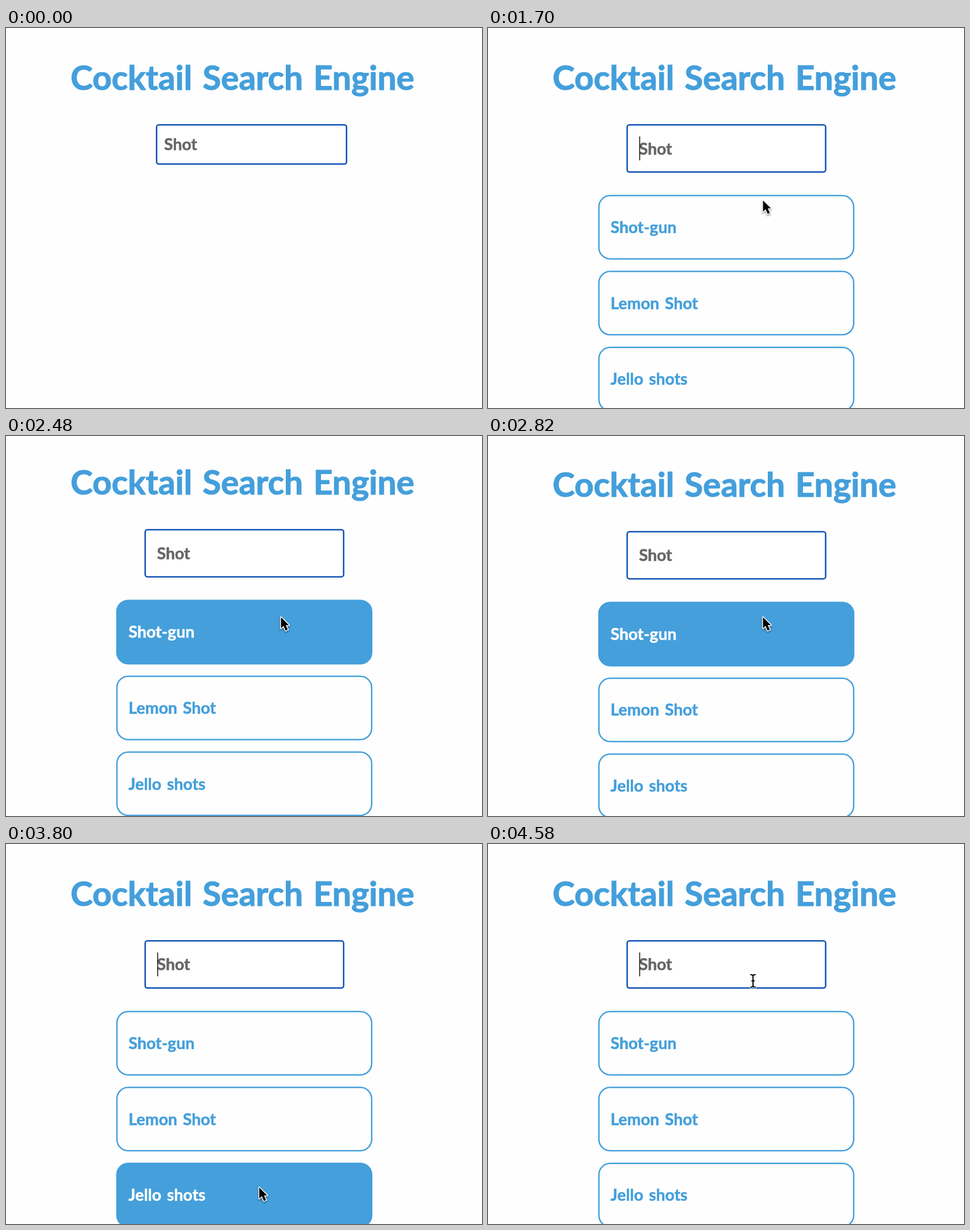
Write an HTML page that moves like this. It is 837x669 px and loops after 4.6 s.

```html
<!DOCTYPE html>
<html lang="en">
<head>
<meta charset="utf-8">
<title>Cocktail Search Engine</title>
<style>
  html, body { margin: 0; width: 100%; height: 100%; overflow: hidden; background: #fefefe; }
  svg { display: block; }
  text { font: 700 28.5px Lato, sans-serif; word-spacing: 3px;
         fill: var(--ink); stroke: var(--ink); stroke-width: .02em; --ink: #449fdb; }
  #title { font-size: 59px; word-spacing: 4px; }
  #hint { --ink: #666; }
  #field { fill: #fff; stroke: #0c50b4; stroke-width: 2.5; }
  .card rect { fill: #fefefe; stroke: #449fdb; stroke-width: 2.5; }
  .card.hover rect { fill: #449fdb; }
  .card.hover text { --ink: #fff; }
  #arrow { stroke: #fff; stroke-width: 3; stroke-linejoin: round; paint-order: stroke;
           filter: drop-shadow(0 2px 1.5px #0006); }
  #beam use { fill: none; stroke-linecap: round; }
</style>
</head>
<body>
<svg width="837" height="669" viewBox="0 0 837 669">
  <defs><path id="beamShape" d="M-4-11Q0-11 0-8Q0-11 4-11M0-8V8M-4 11Q0 11 0 8Q0 11 4 11M-2 0H2"/></defs>
  <g id="page">
    <text id="title" x="113.5" y="109">Cocktail Search Engine</text>
    <rect id="field" y="170.5" rx="4"/>
    <text id="hint">Shot</text>
    <rect id="caret" x="266" y="191" width="1.4" height="42"/>
    <g id="list"></g>
  </g>
  <path id="arrow" d="M0 0V19.5L4.6 15.3L8.2 23.7L12 22L8.4 13.9H14Z"/>
  <g id="beam">
    <use href="#beamShape" stroke="#fff" stroke-width="4"/>
    <use href="#beamShape" stroke="#000" stroke-width="2"/>
  </g>
</svg>
<script>
const LOOP = 4600, LOADED = 20, BLINK = 1100, HOVER_LAG = 40;
const CARD_TOP = 294, CARD_STEP = 133.6, CARD_HEIGHT = 113.5;
const POINTER_START = 1580, FIELD_BOTTOM = 254;
const $ = id => document.getElementById(id);

// The pointer glides from the field to each stop and rests there
const pointerOrigin = { x: 486, y: 258 };
const glides = [
  { start: POINTER_START, length: 180, x: 483.5, y: 319 },
  { start: 3300, length: 200, x: 443, y: 606 },
  { start: 3775, length: 760, x: 466, y: 241 }
];

const clamp = k => Math.min(1, Math.max(0, k));
const smooth = k => k * k * (3 - 2 * k);
const easeOut = k => 1 - (1 - k) ** 3;

function pointerAt(t) {
  let { x, y } = pointerOrigin;
  for (const g of glides) {
    const k = clamp((t - g.start) / g.length);
    x += (g.x - x) * easeOut(k);
    y += (g.y - y) * smooth(k);
  }
  return { x, y };
}

// Overscroll: a quick pull up that settles back slowly
function scrollAt(t) {
  const k = Math.max(0, (t - 2160) / 200);
  return -6.4 * k * Math.exp(1 - k);
}

function setAttrs(el, attrs) {
  for (const name in attrs) el.setAttribute(name, attrs[name]);
}

const show = (el, on) => setAttrs(el, { visibility: on ? 'visible' : 'hidden' });
const move = (el, x, y) => setAttrs(el, { transform: `translate(${x} ${y})` });

$('list').innerHTML = ['Shot-gun', 'Lemon Shot', 'Jello shots'].map((name, i) =>
  `<g class="card" transform="translate(194 ${CARD_TOP + i * CARD_STEP})">
    <rect x="1" y="1" width="448" height="111.5" rx="20"/>
    <text x="21.5" y="67">${name}</text>
  </g>`).join('');
const cards = [...$('list').children];

function render(t) {
  const loaded = t >= LOADED;
  setAttrs($('field'), loaded ? { x: 244.7, width: 349, height: 83 } : { x: 264.8, width: 334, height: 69 });
  setAttrs($('hint'), loaded ? { x: 265.5, y: 222.5 } : { x: 278, y: 215 });
  show($('list'), loaded);
  show($('caret'), Math.floor((t - 200) / BLINK) % 2 === 1);

  const scroll = scrollAt(t);
  move($('page'), 0, scroll);

  const { x, y } = pointerAt(t);
  const active = t >= POINTER_START, overField = y < FIELD_BOTTOM;
  show($('arrow'), active && !overField);
  show($('beam'), active && overField);
  move($('arrow'), x, y);
  move($('beam'), x, y);

  const hoverY = pointerAt(t - HOVER_LAG).y - scroll;
  cards.forEach((card, i) => {
    const offset = hoverY - CARD_TOP - i * CARD_STEP;
    card.classList.toggle('hover', active && offset >= 0 && offset <= CARD_HEIGHT);
  });
}

const start = performance.now();
function tick() {
  render((performance.now() - start) % LOOP);
  requestAnimationFrame(tick);
}
tick();
</script>
</body>
</html>
```
